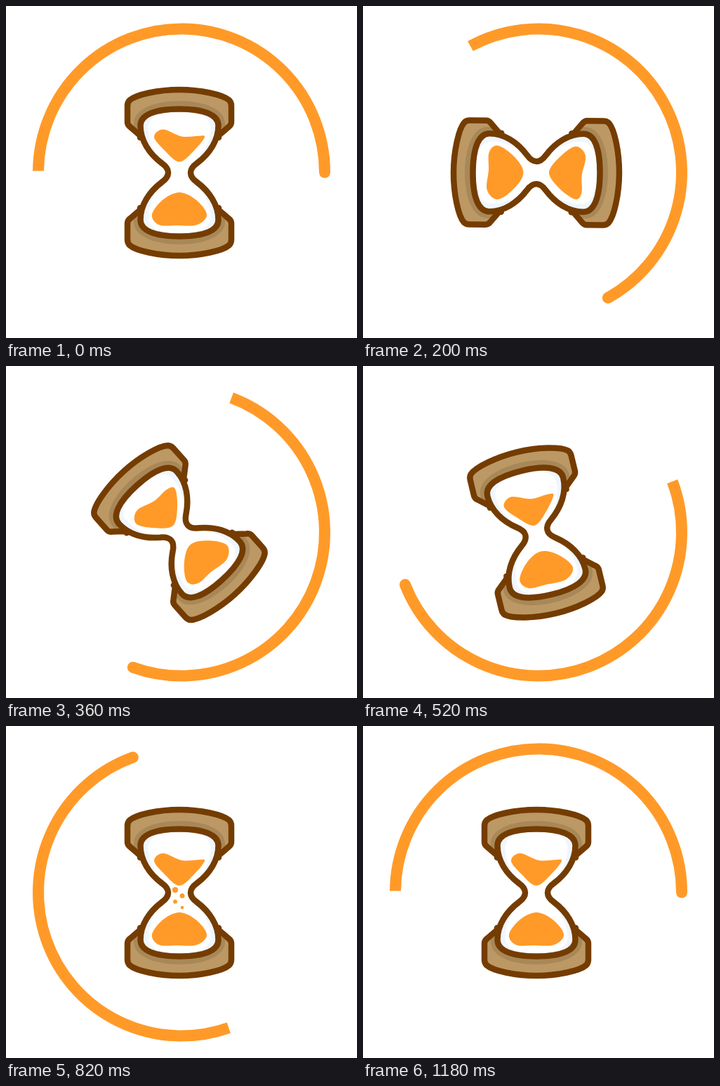
These frames come from a looping animation (500x472 px, 1200 ms). An HTML page with a canvas:

```html
<!DOCTYPE html>
<html lang="en">
<head>
<meta charset="utf-8">
<title>Hourglass loader</title>
<style>
  html, body { margin: 0; width: 100%; height: 100%; overflow: hidden; background: #fff; }
  canvas { display: block; }
</style>
</head>
<body>
<canvas id="stage" width="500" height="472"></canvas>
<script>
const ctx = document.getElementById("stage").getContext("2d");
const LOOP = 1200, STEP = 20, TAU = Math.PI * 2;
const ORANGE = "#ff9a28", OUTLINE = "#743c00", WOOD = "#bc9865", SHADE = "#a88858";

const clamp = v => Math.max(0, Math.min(1, v));
const mix = (a, b, k) => a + (b - a) * k;
const easeOut = u => 1 - (1 - u) ** 2;
const smooth = u => u * u * (3 - 2 * u);

// Joins the right half of a shape to its mirror image; halves start and end on the axis.
function mirrored(half) {
  const path = new Path2D(half);
  path.addPath(new Path2D(half), new DOMMatrix([-1, 0, 0, 1, 0, 0]));
  return path;
}

const CAP = mirrored("M0-118C30-118 62-111 71-103Q74-100 74-95V-72Q74-68 70-65L56-53V-50H0");
const CAP_SHADE = mirrored("M0-102C36-102 65-90 65-70V-50H0");
const GLASS = mirrored(
  "M0-90.5C36-90.5 55.5-82 55.5-67C55.5-46 43-27 25-13.5C13-5 13 5 25 13.5" +
  "C43 27 55.5 46 55.5 67C55.5 82 36 90.5 0 90.5");

function drawRing(frame) {
  const radius = 204, head = frame / 59 * TAU, tail = head + Math.PI + 0.01;
  ctx.strokeStyle = ctx.fillStyle = ORANGE;
  ctx.lineWidth = 16;
  ctx.beginPath();
  ctx.arc(250, 236.5, radius, tail, head + TAU);
  ctx.stroke();
  ctx.beginPath();
  ctx.arc(250 + radius * Math.cos(head), 236.5 + radius * Math.sin(head), 8, 0, TAU);
  ctx.fill();
}

function drawCap(flip) {
  ctx.save();
  ctx.scale(1, flip);
  ctx.fillStyle = WOOD;
  ctx.fill(CAP);
  ctx.save();
  ctx.clip(CAP);
  ctx.fillStyle = SHADE;
  ctx.fill(CAP_SHADE);
  ctx.restore();
  ctx.stroke(CAP);
  ctx.restore();
}

function drawGlass() {
  ctx.fillStyle = "#f0f6fe";
  ctx.fill(GLASS);
  ctx.save();
  ctx.scale(0.8, 0.95);
  ctx.fillStyle = "#fff";
  ctx.fill(GLASS);
  ctx.restore();
  ctx.stroke(GLASS);
}

function fillSmooth(points) {
  const at = i => points[(i + points.length) % points.length];
  ctx.beginPath();
  ctx.moveTo(...points[0]);
  points.forEach((b, i) => {
    const a = at(i - 1), c = at(i + 1), d = at(i + 2);
    ctx.bezierCurveTo(
      b[0] + (c[0] - a[0]) / 6, b[1] + (c[1] - a[1]) / 6,
      c[0] - (d[0] - b[0]) / 6, c[1] - (d[1] - b[1]) / 6, ...c);
  });
  ctx.fillStyle = ORANGE;
  ctx.fill();
}

// Sand is a heap on the cap (pool = 0) or a wavy pool above the neck (pool = 1).
// side is -1 for the upper bulb and 1 for the lower one.
function drawSand(side, tipPool, pool, shift) {
  const tip = mix(28, 10, tipPool) + shift;
  const base = mix(75, 50, pool) + shift;
  const width = mix(39, 36, pool);
  const middle = mix(0.22, 0.42, pool), edge = mix(0.67, 0.88, pool);
  const outline = [
    [0, 0], [0.6, middle], [1, edge], [0.75, 0.98 - 0.06 * pool], [0.1, 1 - 0.1 * pool],
    [-0.65, 0.98 + 0.17 * pool], [-1, edge], [-0.6, middle]
  ];
  fillSmooth(outline.map(([x, y]) => [-side * x * width, side * mix(tip, base, y)]));
}

function drawGrains(time) {
  const fall = (time - 680) / 280;
  ctx.globalAlpha = clamp((time - 640) / 150) * clamp((1160 - time) / 140);
  for (let i = 0; i < 4; i++) {
    const radius = 4.4 - 0.4 * i - fall * (0.7 + 0.4 * i);
    ctx.beginPath();
    ctx.arc(i % 2 ? 4 : -6, 8.3 * i - 7 + 6.2 * fall, Math.max(0, radius), 0, TAU);
    ctx.fill();
  }
  ctx.globalAlpha = 1;
}

function drawHourglass(time) {
  const remaining = (1 - clamp(time / 780)) ** 2.35;
  const flow = clamp(time / 640);
  ctx.save();
  ctx.translate(247, 237);
  ctx.rotate(-Math.PI * remaining);
  ctx.strokeStyle = OUTLINE;
  ctx.lineWidth = 8.5;
  ctx.lineJoin = "round";
  drawCap(1);
  drawCap(-1);
  drawGlass();
  drawSand(-1, easeOut(flow), smooth(flow), 0);
  drawSand(1, 1 - smooth(flow), 1 - easeOut(flow), 5.5 * (1 - flow));
  drawGrains(time);
  ctx.restore();
}

const start = performance.now();
function render() {
  const frame = Math.floor((performance.now() - start) % LOOP / STEP);
  ctx.fillStyle = "#fff";
  ctx.fillRect(0, 0, 500, 472);
  drawRing(frame);
  drawHourglass(frame * STEP);
  requestAnimationFrame(render);
}
render();
</script>
</body>
</html>
```
